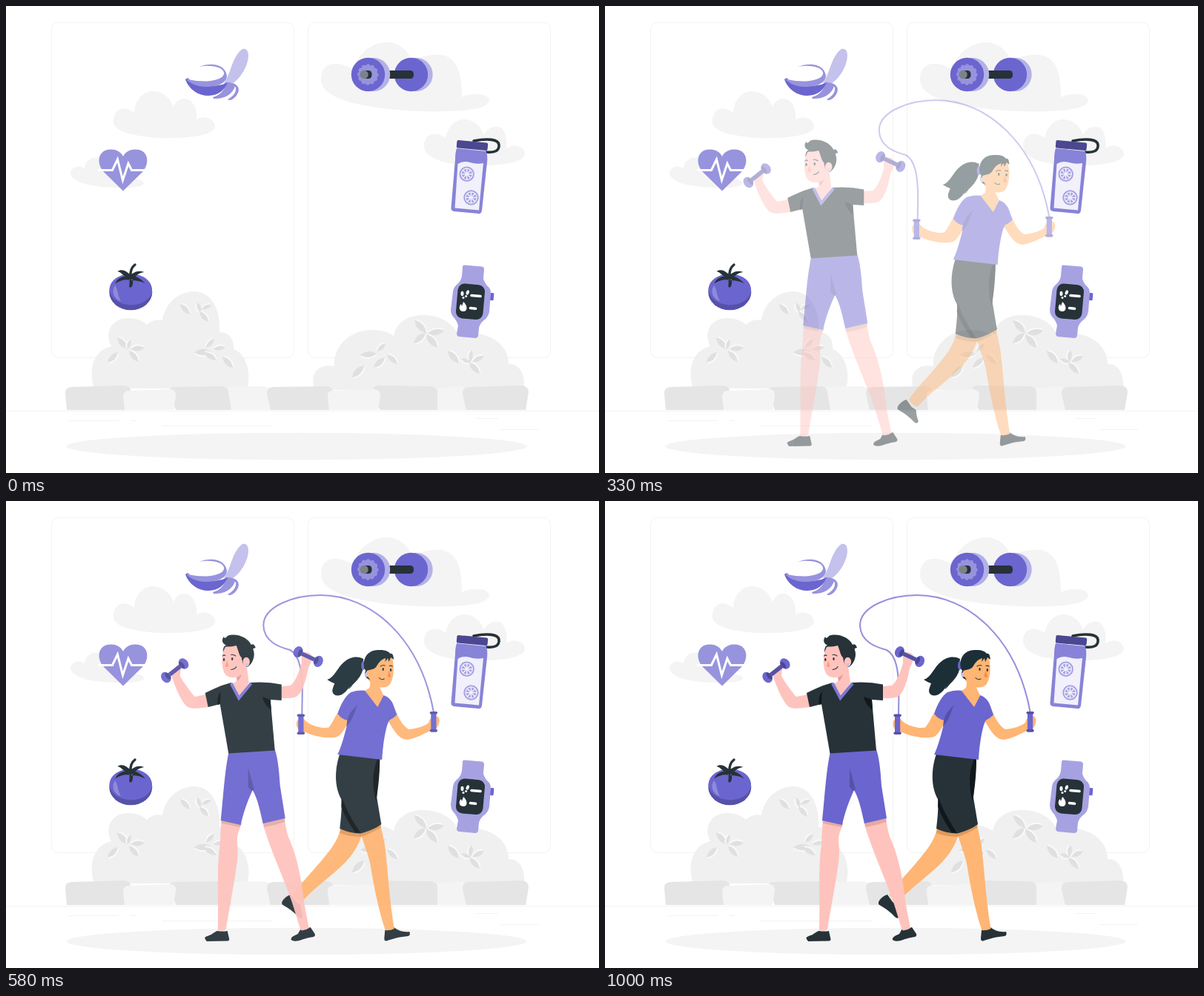
These frames come from a looping animation (800 by 630 pixels, 1.04 s). An HTML page:

```html
<!DOCTYPE html>
<html lang="en">
<head>
<meta charset="utf-8">
<title>Workout pair</title>
<style>
  html, body { margin: 0; width: 100%; height: 100%; overflow: hidden; background: #fff; }
  svg { display: block; }
  .p { fill: #6b65cf; } .p3 { fill: #9793dd; } .p4 { fill: #a6a2e2; } .p5 { fill: #b4b1e8; } .p6 { fill: #c4c1ec; }
  .pd { fill: #4b4791; } .ps { fill: #5651a8; }
  .d { fill: #263238; } .h { fill: #1c2f36; } .k { fill: #11181b; }
  .s1 { fill: #ffc3bd; } .s1d { fill: #e5aaa4; } .s2 { fill: #ffb573; } .s2d { fill: #df9a5c; }
  .c { fill: #f4f4f4; } .e { fill: #e5e5e5; } .b { fill: #f0f0f0; }
  .ln { fill: none; stroke: #263238; stroke-linecap: round; stroke-linejoin: round; }
  .thin { stroke-width: 1.1; }
  .w { fill: none; stroke: #fff; }
</style>
</head>
<body>
<svg width="800" height="630" viewBox="0 0 800 630">
  <defs>
    <g id="weight">
      <rect class="ps" x="-13" y="-2.8" width="26" height="5.6"/>
      <ellipse class="p" cx="-15" rx="6.2" ry="7.8"/><ellipse class="pd" cx="-12" rx="2.6" ry="5.2"/>
      <ellipse class="p" cx="15" rx="6.2" ry="7.8"/><ellipse class="pd" cx="12" rx="2.6" ry="5.2"/>
    </g>
    <g id="grip">
      <rect class="p" x="-3.6" y="-13" width="7.2" height="27"/>
      <rect class="ps" x="-5.2" y="-13.5" width="10.4" height="3.6" rx="1.8"/><rect class="ps" x="-5.2" y="10.5" width="10.4" height="3.6" rx="1.8"/>
    </g>
    <g id="slice">
      <circle r="9.2" fill="none" stroke="#a6a2e2" stroke-width="2"/>
      <circle class="p4" r="7"/>
      <path d="M-8 0H8M0 -8V8M-5.6 -5.6L5.6 5.6M-5.6 5.6L5.6 -5.6" stroke="#f1f0fb" stroke-width="1.5"/>
    </g>
  </defs>

  <g fill="none" stroke="#f3f3f3">
    <rect x="61.5" y="22.5" width="327" height="452" rx="9"/>
    <rect x="407.5" y="22.5" width="327" height="452" rx="9"/>
    <path d="M0 546.5H800M84 559.5H152M168 559.5H176M210 566.5H360M634 556.5H664M667 571.5H719"/>
  </g>
  <ellipse class="c" cx="392" cy="594" rx="310.5" ry="18.3"/>

  <g class="c">
    <path d="M145 153C147 137 160 134 173 144C174 125 186 115 198 115C214 115 224 128 226 137C229 125 241 122 249 128C256 134 258 145 257 154C266 146 282 152 282 163C280 176 240 179 205 178C165 175 142 168 145 153Z"/>
    <path d="M87 224C92 214 101 216 106 219C107 207 118 203 127 205C140 206 150 218 152 228C160 226 166 230 168 235C176 233 186 234 186 240C182 246 150 246 130 244C108 242 86 236 87 224Z"/>
    <path d="M425 97C426 76 447 72 468 86C476 60 497 49 515 49C533 50 544 62 548 76C552 70 570 65 588 66C608 70 615 88 615 123C630 116 652 118 652 128C648 141 610 143 560 142C490 139 422 128 425 97Z"/>
    <path d="M564 186C566 172 580 168 593 178C597 160 608 153 618 153C632 153 641 163 645 174C650 162 664 160 670 166C676 174 676 186 675 192C686 184 700 190 700 200C698 212 665 216 630 215C590 214 562 205 564 186Z"/>
  </g>

  <g class="b">
    <path d="M119 516C111 492 117 465 142 459C132 440 143 421 165 421C175 421 184 424 190 430C196 424 204 422 211 424C214 402 232 385 255 385C279 386 290 413 288 440C302 440 308 450 307 463C323 468 332 494 325 516Z"/>
    <path d="M417 518C409 500 418 481 443 486C441 458 465 437 493 437C506 437 516 440 523 445C527 426 543 417 562 417C585 417 603 427 609 443C642 436 678 451 678 483C694 482 702 500 698 518Z"/>
  </g>
  <g id="leaves"></g>
  <path class="c" d="M292 545L292 520Q292 514 299 514L345 513Q362 515 362 523L360 545ZM580 545V516L617 513L622 545Z"/>
  <g class="e">
    <path d="M82 545L80 523Q79 515 88 514L158 512Q167 512 168 518L172 545Z"/>
    <path d="M229 545L221 520Q220 514 227 514L290 513Q299 513 300 520L304 545Z"/>
    <path d="M357 545L352 523Q351 515 360 514L432 513Q441 513 441 521L443 545Z"/>
    <path d="M504 545L496 520Q494 512 503 512L573 513Q582 514 582 521V545Z"/>
    <path d="M621 545L616 524Q615 515 624 514L694 512Q705 512 705 521L701 545Z"/>
  </g>
  <g class="c">
    <path d="M160 545L158 527Q158 519 166 519L222 517Q230 518 229 526L226 545Z"/>
    <path d="M436 545L434 527Q433 519 441 519L497 517Q505 518 505 526L502 545Z"/>
  </g>

  <!-- banana -->
  <path class="p6" d="M294 104C304 90 305 68 319 58C327 56 329 66 325 78C320 92 311 103 299 108Z"/>
  <path class="p3" d="M279 123C290 120 296 112 297 103Q308 103 309 108C306 119 294 126 280 125ZM297 103C312 103 316 110 313 117C310 124 303 129 299 126C306 122 311 117 310 110Q307 105 297 107Z"/>
  <path class="p" d="M242 99C247 113 260 121 273 121C287 121 296 112 299 103C285 111 256 109 245 97Z"/>
  <path class="p3" d="M244 98C255 103 290 104 294 92C296 84 280 78 260 82C278 75 296 79 298 94C298 104 285 109 270 109C258 109 250 105 244 100Z"/>

  <!-- heart -->
  <path class="p3" d="M158 249.5L132 224C121 212 124 193 142 193.5C150 193.5 156 198 158 203C160 198 166 193.5 174 193.5C192 193 195 212 184 224Z"/>
  <path class="w" stroke-width="3" d="M124 221.500H143.500L150.500 207L157.500 235L165 212.500L169.500 221.500H192"/>

  <!-- tomato -->
  <ellipse class="ps" cx="168.300" cy="386" rx="29" ry="24.300"/>
  <path class="p" d="M139.500 384C139 370 153 361.500 168 361.500C185 361.500 198 371 197 385C192 409 146 410 139.500 384Z"/>
  <path fill="#8f8bda" d="M147 377C141 386 147 396 155 398C150 390 152 384 147 377Z"/>
  <path class="ln" stroke-width="3.400" d="M168 365C167.500 358 170 352 174 349"/>
  <path class="d" d="M168 369C161 367 156 359 150.500 358C158 353 165 360 170 365ZM169 370C161 368 154 370 147.500 374.500C150 366 160 363 169 365ZM165 366C168 370 166 376 166.500 379Q169 381 170.500 377Q172 372 170 366ZM167 364C176 363 183 369 188 374.500C182 371 175 370 167 370ZM166 366C171 359 178 356 186.500 359C179 360 175 364 170 369Z"/>

  <!-- dumbbell -->
  <circle class="p5" cx="553" cy="92.500" r="22.700"/><circle class="p" cx="546.500" cy="92.500" r="22.700"/>
  <rect class="d" x="508" y="87" width="42" height="11" rx="4.500"/>
  <circle class="p5" cx="495.500" cy="92.500" r="22.700"/><circle class="p" cx="488.500" cy="92.500" r="22.700"/>
  <circle class="p3" cx="488.300" cy="92.500" r="12.800"/>
  <circle cx="488.300" cy="92.500" r="12" fill="none" stroke="#9793dd" stroke-width="4.600" stroke-linecap="round" pathLength="72" stroke-dasharray=".6 5.4"/>
  <rect class="d" x="481" y="87" width="12.500" height="11" rx="4.500"/><circle cx="483" cy="92.500" r="5.700" fill="#7c8388"/>

  <!-- bottle -->
  <path class="ln" stroke-width="3.600" d="M631 182C650 178 664 180 665 187C666 196 658 198 648 197"/>
  <path fill="#8783d8" d="M608 192L648 196Q650 203 649 211L642 276Q641 281 637 280L604 277Q600 276 600.500 272L606 207Q606 198 608 192Z"/>
  <path fill="#f1f0fb" d="M609.500 213Q617 208 626 211T644 212L638 275.500L605.500 272.500Z"/>
  <rect class="pd" x="-21" y="-5.300" width="42" height="10.600" rx="2" transform="translate(629 188) rotate(5)"/>
  <use href="#slice" x="621.700" y="226.700"/><use href="#slice" x="627.500" y="258.500"/>

  <!-- watch -->
  <rect class="p" x="653" y="387" width="5" height="10" rx="1" transform="rotate(5 655 392)"/>
  <path class="p4" d="M618 349.500L642 351.500Q645 352 645 355L644 368Q646 375 651 379Q654 382 654 388L652 412Q651 419 646 423Q640 427 638 434L637 445Q636 448 633 448L611 446Q608 445 608 442L610 431Q608 424 603 419Q600 415 600 410L603 385Q604 379 609 375Q614 371 615 364L616 352Q616 349.500 618 349.500Z"/>
  <rect class="d" x="-18.300" y="-23.500" width="36.600" height="47" rx="9" transform="translate(626.500 398.800) rotate(5)"/>
  <g fill="#fff">
    <ellipse cx="615.500" cy="388" rx="2" ry="3.300"/><circle cx="617" cy="393.500" r="1.500"/>
    <ellipse cx="622.800" cy="386.500" rx="2" ry="3.300" transform="rotate(20 622.800 386.500)"/><circle cx="620.700" cy="391.500" r="1.500"/>
    <path d="M617 399C623 404 623 412 617 412C610 412 611 404 614 402L615 405Z"/>
  </g>
  <path class="w" stroke-width="3.600" stroke-linecap="round" d="M628 390.500L640 391.500M626.500 407.500L633.500 408.200"/>

  <g id="woman">
    <path d="M396 288L396.500 255C396 230 393 208 380 201C365 197 345 190 344 168C344 142 385 127 421 127C490 127 555 185 573.500 284" fill="none" stroke="#9691dc" stroke-width="2.100"/>
    <path class="d" d="M369 541C371 536 377 532 381 531L388 541L394 545C394 552 396 556 397 560C396 564 393 563 390 560C382 551 373 547 369 544Z"/>
    <path class="s2" d="M448 442L477 448C473 468 457 487 441 500C425 514 407 527 396 541Q389 539 384 531C395 515 410 500 420 488C433 472 444 460 448 442Z"/>
    <path class="d" d="M508 579C512 578 517 577 520 575C525 579 532 582 541 581Q543 586 539 587C528 588 520 590 510 593.500Q507 594 507 590Z"/>
    <path class="s2" d="M474 444L501 434C505 450 508 462 509 475C512 500 513 530 520.500 577Q514 580 508.500 579C500 555 493 520 489 495C487 480 480 465 474 444Z"/>
    <path class="s2d" d="M448 442L503 434L502 441Q488 449 476 453Q460 453 447 448Z"/>
    <path class="d" d="M447 341L501 348C500 370 498 385 497 400L503 436C495 442 485 446 475 448.500Q460 448 447 442C449 425 450 412 449 402C442 390 438 368 447 341Z"/>
    <path class="k" d="M498 347L501 348C501 372 498 392 496 405C490 385 491 365 498 347ZM450 400C456 418 467 436 475 448L468 447.500C459 434 452 422 449 412Z"/>

    <path class="s2" d="M444 286L460 295C456 303 451 314 444 318C436 321 415 319 401 312C392 312 387 305 389 297Q392 292 399 294C401 300 420 308 432 305.500C437 300 440 292 444 286Z"/>
    <path class="s2" d="M524 287C528 296 533 304 540 308C552 307 563 303 567 299Q568 291 577 290Q583 292 581 299C580 305 577 307 574 308C560 314 548 321 538 322C528 322 521 312 512 296Z"/>
    <path class="p" d="M462 258C470 255 478 255 482 256L498 277L506 262C513 264 518 270 520 277L524 288C520 293 515 295 513 296C508 310 505 330 504 349L444 342C450 330 455 310 458 296Q450 295 444 287C448 275 455 262 462 258Z"/>
    <path class="ps" d="M457 296C460 285 466 280 471 275C466 285 465 296 456 304ZM513 296L517 287L511 303Z"/>
    <use href="#grip" x="394.600" y="301"/><use href="#grip" x="573.600" y="297.500"/>

    <path class="h" d="M479 213C470 208 460 211 453 217C444 224 440 238 430 241Q436 245 440 246C438 252 434 258 441 262C449 264 455 258 459 252C467 246 477 238 478 222Z"/>
    <path class="ln thin" d="M478 226C475 238 470 240 465 246Q462 251 459 253"/>
    <ellipse class="p" cx="478.500" cy="222" rx="2.500" ry="6"/>
    <path class="s2" d="M489 240L487 252L481 256L498 278L506 262L499 248Z"/>
    <path class="s2" d="M484 215C492 206 515 206 518 212C521 226 520 240 514 248C508 254 496 252 490 246C482 240 480 225 484 215Z"/>
    <path class="h" d="M480 226C477 212 485 203 494 201.500C506 200 513 202 515 206C519 205 519 209 520 214L516 211L513 217L512 212L508 217L509 212C502 214 499 219 496 224C492 228 488 227 485 229C484 233 484 237 488 241C481 239 479 234 482 229Z"/>
    <ellipse class="s2" cx="486" cy="233" rx="3.600" ry="4.800"/><ellipse class="p6" cx="482.500" cy="234.500" rx="1.700" ry="3.200"/>
    <g class="d"><ellipse cx="505.500" cy="227" rx="1.200" ry="1.900"/><ellipse cx="515.800" cy="228" rx="1.200" ry="1.900"/></g>
    <path class="ln thin" d="M502 223Q505 220.500 508 222M514 222.500Q516 221.500 518 223M500 238.500Q503 242 507 240"/>
    <path d="M513.500 229L516 237Q513.500 239 511.500 236.500Z" fill="#f58a42"/>
  </g>

  <g id="man">
    <path class="d" d="M272 591C270 588 275 587 280 585C284 582 287 580 289 580Q296 581 302 580L304.500 591Q304.500 593.500 302 593.500L274 594ZM388 592C387 588 393 586 397 584L401 577Q408 578 414 575L420 584Q421 587 418 588C410 589 405 591 399 593Q391 595 388 592Z"/>
    <path class="s1" d="M294 430L321 435C318 445 314 450 315.500 464C318 482 311 512 300 578Q295 581 289 579C290 540 288 505 290.500 475C293 460 292 450 294 430Z"/>
    <path class="s1" d="M349 433L379 428C381 440 382 449 386 457C396 480 402 510 406 545L412 576Q407 580 401 579C396 565 392 548 385 530C372 495 358 465 349 433Z"/>
    <path class="s1d" d="M294 430L321 435L319 440L294 435ZM350 433L379 428L379.500 433Q365 438 351.500 440Z"/>
    <path class="p" d="M304 338L366 335C371 350 372 370 373 384L380 428L350 435C346 418 343 402 336 390C329 405 323 422 320 437L293 431C296 405 298 365 304 338Z"/>
    <path class="ps" d="M330 360L338 389L335 391L330 386Z"/>

    <path class="s1" d="M273 261L277 278C268 279 254 282 247 277C240 270 233 255 228 240C225 233 230 224 236 221Q240 222 239 227L238 236C245 248 254 260 258 264Z"/>
    <path class="s1" d="M374 250L387 249C393 244 397 235 402 219L402 207C406 202 413 203 417 210C416 216 413 221 411 226C408 242 403 260 394 264.500Q386 267 374 266Z"/>
    <path class="s1" d="M315 234L328 222L331 245L318 267L305 247Q315 245 316 240Z"/>
    <path fill="#e99b94" d="M314 238L321 234Q319 241 315 243Z"/>
    <path class="d" d="M307 245L294 249Q282 254 272 259L276 278L292 274L303.500 340.500L366 336.500L360 268L375 269V247.500Q354 243 333 245L317 267Z"/>
    <path class="k" d="M349 264L360 268L361 282Q352 276 349 264ZM293 257Q287 264 289 275L292 274Z"/>
    <path d="M307 246L317.500 266L334 246" fill="none" stroke="#7d78d5" stroke-width="4"/>
    <use href="#weight" transform="translate(231 228.700) rotate(-38)"/>
    <use href="#weight" transform="translate(411 210) rotate(25)"/>

    <path class="s1" d="M298 197C295 206 293 220 297 230C300 239 312 240 318 236C325 231 330 222 331 214L322 194Z"/>
    <path class="d" d="M296 204C296 198 298 194 301 195C296 193 293 189 297 183C298 186 300 185 302 182C314 177 331 185 334 194C336 192 339 194 340 198C337 199 336 199 337 201C340 209 336 220 329 224C324 223 322 218 321 211C318 209 317 202 314 195C308 197 302 196 299 197Z"/>
    <ellipse class="s1" cx="327.500" cy="217" rx="4.600" ry="6.300"/>
    <ellipse class="p6" cx="328" cy="221" rx="1.800" ry="2.800"/>
    <g class="d"><ellipse cx="297.300" cy="214" rx="1.200" ry="1.900"/><ellipse cx="308.500" cy="213" rx="1.200" ry="1.900"/></g>
    <path class="ln thin" d="M295.500 209Q297 207 299 208.500M307 207.500Q310 206.500 313 209M307 227.500Q312 227 314 223.500"/>
    <path d="M301.500 215L298.800 222.500Q301 225 303.500 223Z" fill="#ff9d78"/>
  </g>
</svg>
<script>
const LOOP = 1040, FPS = 24, SLIDE = 48, LEAD = 0.8;

// Each leaf runs from its base to its tip.
const leaves = [
  [150,447,164,463], [168,463,187,461], [166,465,179,480], [151,467,137,481], [164,463,168,450],
  [235,402,248,416], [263,414,258,400], [264,409,277,403], [261,412,273,426],
  [278,467,254,467], [270,461,281,449], [280,463,296,460], [267,467,284,478], [292,473,306,488],
  [483,485,467,501], [500,469,478,471], [501,466,512,455], [514,470,528,483], [511,474,496,488],
  [551,424,567,441], [569,442,591,438], [567,443,582,461], [566,441,550,455],
  [596,465,611,482], [626,480,628,464], [629,480,645,472], [625,481,639,496], [627,481,614,476]
];
const leafPath = (length, bulge) => `M0 0Q${length / 2} ${-bulge} ${length} 0Q${length / 2} ${bulge} 0 0Z`;
document.getElementById('leaves').innerHTML = leaves.map(([x, y, tipX, tipY]) => {
  const length = Math.hypot(tipX - x, tipY - y);
  const angle = Math.atan2(tipY - y, tipX - x) * 180 / Math.PI;
  const d = leafPath(length, length * 0.36);
  return `<g transform="translate(${x} ${y}) rotate(${angle})">` +
    `<path d="${d}" fill="#fafafa" transform="translate(0 -2)"/><path d="${d}" fill="#e0e0e0"/></g>`;
}).join('');

const bezier = (s, a, b) => 3 * (1 - s) ** 2 * s * a + 3 * (1 - s) * s * s * b + s ** 3;

// Eases in, overshoots, then settles.
function ease(x) {
  let low = 0, high = 1;
  for (let i = 0; i < 24; i++) {
    const mid = (low + high) / 2;
    if (bezier(mid, 0.36, 0.5) < x) low = mid; else high = mid;
  }
  return bezier(low, -0.01, 1.38);
}

const man = document.getElementById('man');
const woman = document.getElementById('woman');

function place(node, dx, opacity) {
  node.setAttribute('transform', `translate(${dx.toFixed(2)} 0)`);
  node.setAttribute('opacity', opacity);
}

function draw(time) {
  const step = Math.floor((time % LOOP + 5) * FPS / 1000);
  const progress = step < 2 ? 0 : ease(Math.min(1, (step + LEAD) / FPS));
  const opacity = Math.max(0, Math.min(1, progress));
  const offset = SLIDE * (1 - progress);
  place(man, -offset, opacity);
  place(woman, offset, opacity);
}

const start = performance.now();
function tick(now) {
  draw(Math.max(0, now - start));
  requestAnimationFrame(tick);
}
draw(0);
requestAnimationFrame(tick);
</script>
</body>
</html>
```
